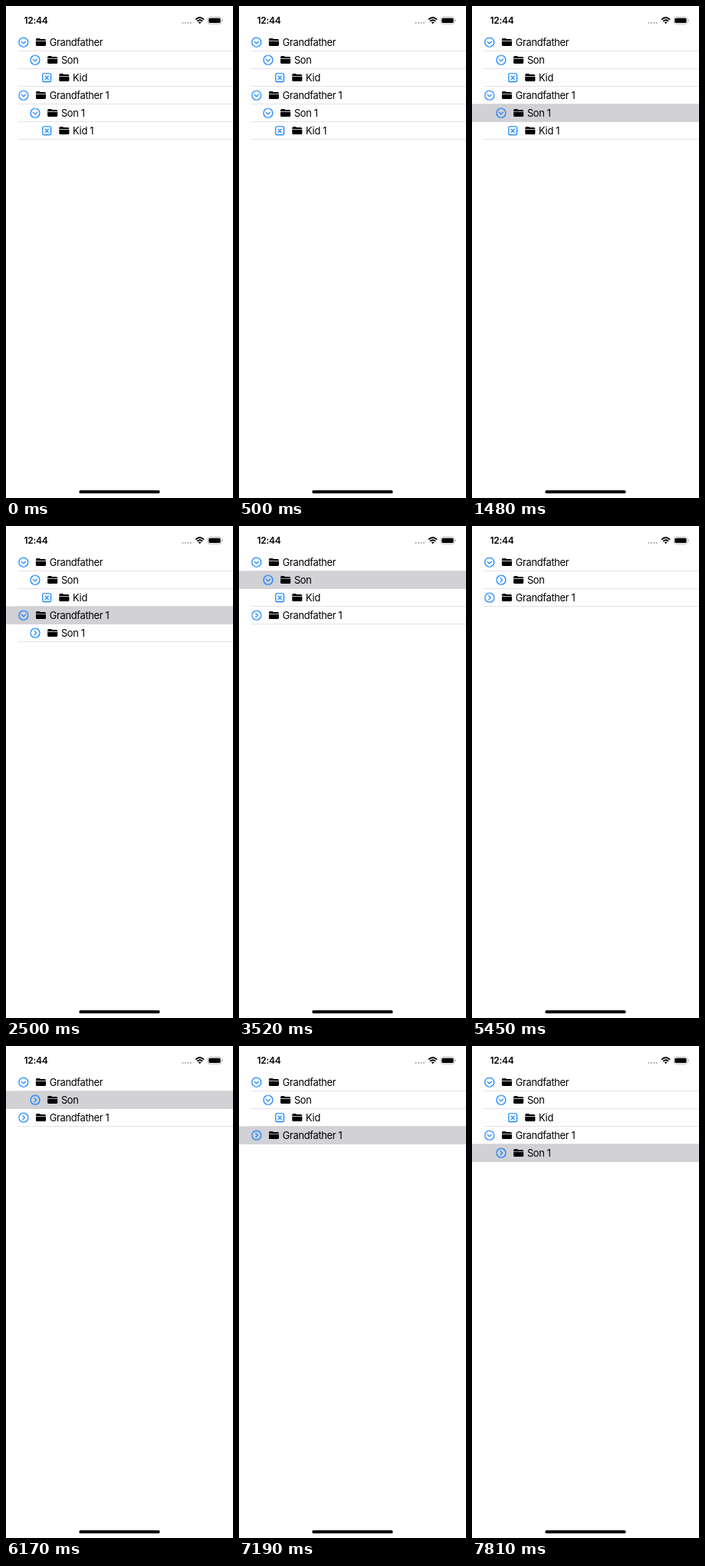
These frames come from a looping animation (296x640 px, 8 s). An HTML page:

```html
<!DOCTYPE html>
<html lang="en">
<head>
<meta charset="utf-8">
<title>Folder tree</title>
<style>
  html, body { margin: 0; width: 100%; height: 100%; overflow: hidden; background: #fff; }
  svg { display: block; width: 296px; height: 640px; }
  text { font: 12.9px Inter, "Liberation Sans", sans-serif; letter-spacing: -.33px; }
  .clock { font-size: 12px; font-weight: 600; letter-spacing: -.3px; }
  .icon { fill: none; stroke: #007aff; stroke-width: 1.15; stroke-linecap: round; stroke-linejoin: round; }

  .anim { animation: 8s step-end infinite; }
  .select { animation-name: select; }
  .cover { animation-name: cover; }
  .son-arrow { animation-name: son-arrow; }
  .kid { animation-name: kid; }
  .second { animation-name: second; }
  .second-arrow { animation-name: second-arrow; }
  .son1 { animation-name: son1; }
  .son1-arrow { animation-name: son1-arrow; }
  .kid1 { animation-name: kid1; }

  /* one list row is 23px high */
  @keyframes select {
    0%      { opacity: 0; transform: translateY(92px); }
    18.5%   { opacity: 1; transform: translateY(92px); }
    31.25%  { opacity: 1; transform: translateY(69px); }
    44%     { opacity: 1; transform: translateY(23px); }
    54.625% { opacity: 1; transform: translateY(0); }
    68.125% { opacity: 0; transform: translateY(0); }
    77.125% { opacity: 1; transform: translateY(23px); }
    89.875% { opacity: 1; transform: translateY(69px); }
    97.625%, 100% { opacity: 1; transform: translateY(92px); }
  }
  @keyframes cover {
    0%      { transform: translateY(138px); }
    31.25%  { transform: translateY(115px); }
    44%     { transform: translateY(92px); }
    54.625% { transform: translateY(69px); }
    89.875% { transform: translateY(92px); }
    97.625%, 100% { transform: translateY(115px); }
  }
  @keyframes son-arrow {
    0%      { transform: rotate(0deg); }
    54.625% { transform: rotate(-90deg); }
    89.875%, 100% { transform: rotate(0deg); }
  }
  @keyframes kid {
    0%      { opacity: 1; }
    54.625% { opacity: 0; }
    89.875%, 100% { opacity: 1; }
  }
  @keyframes second {
    0%      { transform: translateY(0); }
    54.625% { transform: translateY(-23px); }
    89.875%, 100% { transform: translateY(0); }
  }
  @keyframes second-arrow {
    0%  { transform: rotate(0deg); }
    44% { transform: rotate(-90deg); }
    97.625%, 100% { transform: rotate(0deg); }
  }
  @keyframes son1 {
    0%  { opacity: 1; }
    44% { opacity: 0; }
    97.625%, 100% { opacity: 1; }
  }
  @keyframes son1-arrow {
    0% { transform: rotate(0deg); }
    31.25%, 100% { transform: rotate(-90deg); }
  }
  @keyframes kid1 {
    0% { opacity: 1; }
    31.25%, 100% { opacity: 0; }
  }
</style>
</head>
<body>
<svg viewBox="0 0 296 640">
  <defs>
    <g id="arrow" class="icon">
      <circle r="6"/>
      <path d="M-2.8 -1.1L0 1.7L2.8 -1.1"/>
    </g>
    <g id="leaf" class="icon">
      <rect x="-5.4" y="-5.4" width="10.8" height="10.8" rx="1.7"/>
      <path d="M-2.1 -2.1L2.1 2.1M2.1 -2.1L-2.1 2.1"/>
    </g>
    <g id="folder">
      <path d="M16.1 -2.1V-3.4Q16.1 -5.1 17.8 -5.1H20.2Q21 -5.1 21.6 -4.6L22.2 -4.2H27.5Q29.2 -4.2 29.2 -2.5V-2.1Z"/>
      <path d="M16.1 -1.4H29.2V3.2Q29.2 4.9 27.5 4.9H17.8Q16.1 4.9 16.1 3.2Z"/>
    </g>
  </defs>

  <text class="clock" x="23.6" y="23">12:44</text>
  <g fill="#b9b9bb">
    <circle cx="230.5" cy="21.9" r="1.2"/>
    <circle cx="234" cy="21.9" r="1.2"/>
    <circle cx="237.5" cy="21.9" r="1.2"/>
    <circle cx="241" cy="21.9" r="1.2"/>
  </g>
  <g fill="none" stroke="#000" stroke-width="1.9">
    <path d="M247.2 17.6Q252.7 12.6 258.2 17.6"/>
    <path d="M249.2 19.9Q252.7 16.8 256.2 19.9"/>
  </g>
  <path d="M250.8 21.3Q252.7 19.9 254.6 21.3L252.7 23.3Z"/>
  <rect x="263.1" y="14.4" width="17.8" height="8.9" rx="2.7" fill="none" stroke="#a9a9ab" stroke-width=".8"/>
  <rect x="264.4" y="15.7" width="15.2" height="6.3" rx="1.6"/>
  <path d="M281.9 17.4Q283 17.8 283 18.9Q283 20 281.9 20.4Z" fill="#a9a9ab"/>

  <path d="M156 58V174" stroke="#e3e3e5" stroke-width="280" stroke-dasharray="1 22"/>
  <rect class="anim cover" y="36" width="296" height="140" fill="#fff"/>
  <rect class="anim select" y="35.4" width="296" height="23.5" fill="#d1d1d6"/>

  <g transform="translate(22.8 47.2)">
    <use href="#arrow"/>
    <use href="#folder"/>
    <text x="33.9" y="4.6">Grandfather</text>
  </g>
  <g transform="translate(38 70.2)">
    <g class="anim son-arrow"><use href="#arrow"/></g>
    <use href="#folder"/>
    <text x="33.9" y="4.6">Son</text>
  </g>
  <g class="anim kid">
    <g transform="translate(53.2 93.2)">
      <use href="#leaf"/>
      <use href="#folder"/>
      <text x="33.9" y="4.6">Kid</text>
    </g>
  </g>
  <g class="anim second">
    <g transform="translate(22.8 116.2)">
      <g class="anim second-arrow"><use href="#arrow"/></g>
      <use href="#folder"/>
      <text x="33.9" y="4.6">Grandfather 1</text>
    </g>
  </g>
  <g class="anim son1">
    <g transform="translate(38 139.2)">
      <g class="anim son1-arrow"><use href="#arrow"/></g>
      <use href="#folder"/>
      <text x="33.9" y="4.6">Son 1</text>
    </g>
  </g>
  <g class="anim kid1">
    <g transform="translate(53.2 162.2)">
      <use href="#leaf"/>
      <use href="#folder"/>
      <text x="33.9" y="4.6">Kid 1</text>
    </g>
  </g>

  <rect x="95.3" y="630" width="105.4" height="3.9" rx="1.95"/>
</svg>
</body>
</html>
```
